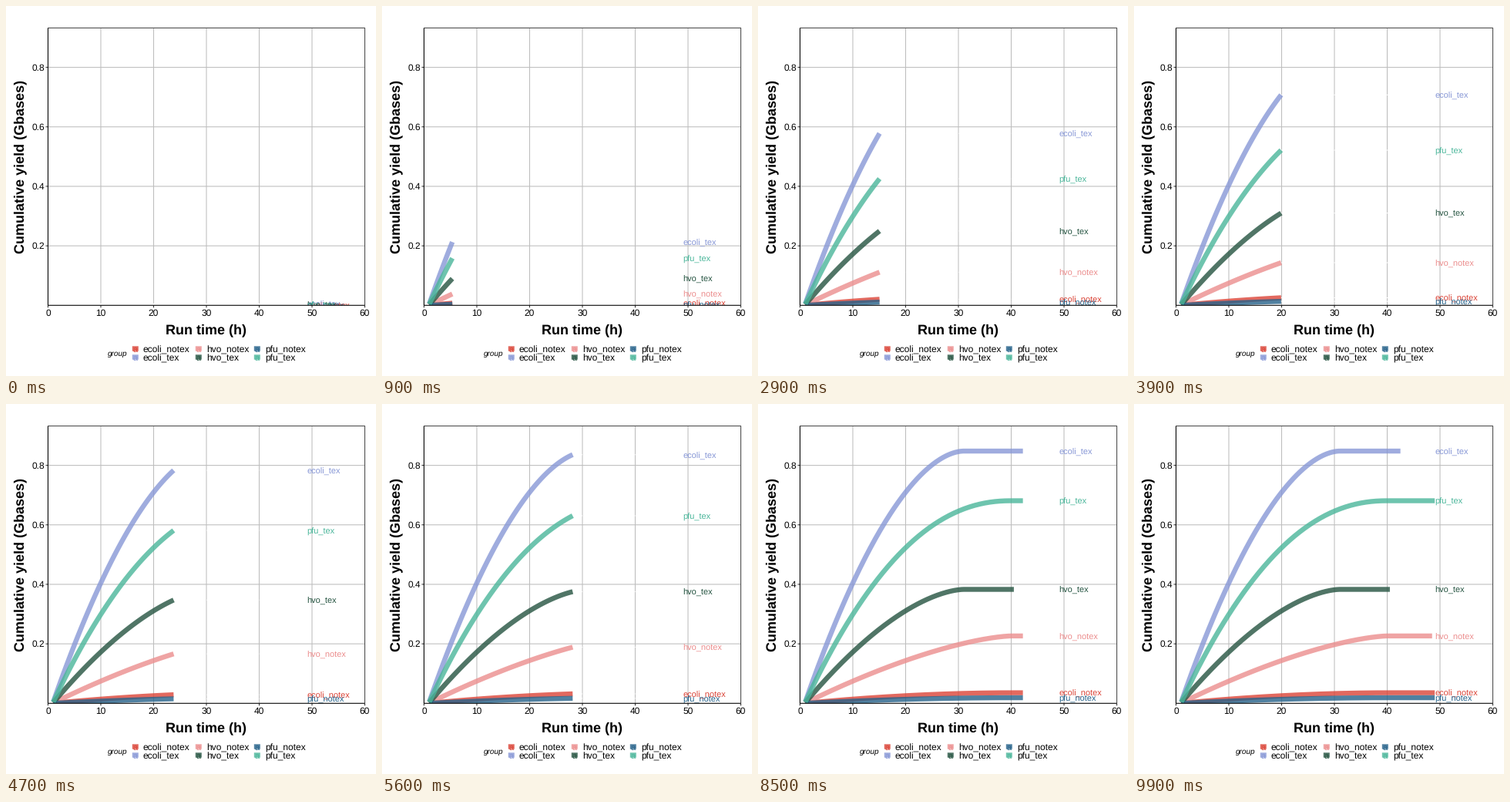
These frames come from a looping animation (480x480 px, 10 s). A matplotlib script:

```python
import numpy as np
import matplotlib.pyplot as plt
from matplotlib.animation import FuncAnimation
from matplotlib.patches import Rectangle

SIZE, DPI = 480, 100
FRAMES, INTERVAL = 100, 100
PT = 72 / DPI
LEFT, RIGHT, TOP, BOTTOM = 54.5, 465.5, 28.5, 388.3
T_START, T_END = 1, 49
ALPHA = 0.8

plt.rcParams.update({
    "font.family": "Liberation Sans",
    "text.hinting": "none",
})

# name: (colour, last hour, saturation hour, final yield, curve power)
GROUPS = {
    "ecoli_notex": ("#db4437", 49, 40, .0355, 1.9),
    "ecoli_tex": ("#8797d6", 42.5, 31, .848, 1.8),
    "hvo_notex": ("#ec8e8e", 48.5, 40, .2265, 1.5),
    "hvo_tex": ("#245340", 40.5, 31, .383, 1.66),
    "pfu_notex": ("#25628a", 49, 40, .0188, 1.85),
    "pfu_tex": ("#4ab69a", 49, 40, .681, 2.18),
}


def px(hour):
    return LEFT + 6.85 * hour


def py(value):
    return BOTTOM - 385.9 * value


def total(t, full, top, power):
    """Yield that rises ever more slowly and stays flat from hour `full`."""
    left = np.clip((full - t) / (full - T_START), 0, 1)
    return top * (1 - 0.994 * left ** power)


fig = plt.figure(figsize=(SIZE / DPI, SIZE / DPI), dpi=DPI, facecolor="white")
ax = fig.add_axes([0, 0, 1, 1])
ax.set_xlim(0, SIZE)
ax.set_ylim(SIZE, 0)
ax.axis("off")


def line(xs, ys, color="black", width=1.07, **kw):
    return ax.plot(xs, ys, color=color, lw=width * PT, snap=False,
                   solid_capstyle="butt", **kw)[0]


def text(x, y, s, size, **kw):
    return ax.text(x, y, s, fontsize=size * PT, va="baseline", **kw)


# Grid, ticks and axis titles
for hour in range(0, 61, 10):
    x = px(hour)
    if 0 < hour < 60:
        line([x, x], [TOP, BOTTOM], "#bebebe", zorder=1)
    line([x, x], [BOTTOM, BOTTOM + 3], "#333333", zorder=6)
    text(x, 401.8, str(hour), 12, ha="center")
for value in (.2, .4, .6, .8):
    y = py(value)
    line([LEFT, RIGHT], [y, y], "#bebebe", zorder=1)
    line([LEFT - 3, LEFT], [y, y], "#333333", zorder=6)
    text(50, y + 3.9, str(value), 12, ha="right")
line([LEFT, RIGHT, RIGHT], [TOP, TOP, BOTTOM], "#4d4d4d", zorder=6)
line([LEFT, LEFT, RIGHT], [TOP, BOTTOM, BOTTOM], zorder=6)
text(260, 425, "Run time (h)", 18, ha="center", weight="bold")
text(23, 208.3, "Cumulative yield (Gbases)", 18, ha="center", weight="bold",
     rotation=90, rotation_mode="anchor")

# Legend
text(132, 454, "group", 10, style="italic")
for k, (name, (color, *_)) in enumerate(GROUPS.items()):
    x, y = 163.8 + 79 * (k // 2), 444.5 + 11 * (k % 2)
    x += 3 * (k // 2 == 1)
    line([x, x + 8], [y, y], color, 6.4, alpha=ALPHA)
    text(x + 4, y + 5, "a", 11, color=color, ha="center")
    text(x + 14, y + 5, name, 12)

# Moving parts, all clipped to the panel
panel = Rectangle((LEFT, TOP), RIGHT - LEFT, BOTTOM - TOP,
                  transform=ax.transData)
parts = []
for k, (name, (color, last, *shape)) in enumerate(GROUPS.items()):
    z = k / 10
    lead = line([], [], "white", ls=(0, (4, 4)), zorder=2 + z)
    trace = line([], [], color, 6.4, alpha=ALPHA, zorder=3 + z,
                 solid_joinstyle="round")
    label = text(px(T_END), 0, name, 11.04, color=color, zorder=4 + z,
                 clip_on=True)
    for part in (lead, trace, label):
        part.set_clip_path(panel)
    parts.append((lead, trace, label, last, shape))


def update(n):
    now = T_START + (T_END - T_START) * n / (FRAMES - 1)
    changed = []
    for lead, trace, label, last, shape in parts:
        end = min(now, last)
        t = np.linspace(T_START, end, 2 + 2 * n)
        y = py(total(t, *shape))
        trace.set_data(px(t), y)
        lead.set_data([px(end), px(T_END)], [y[-1], y[-1]])
        label.set_y(y[-1] + 4.6)
        changed += [lead, trace, label]
    return changed


anim = FuncAnimation(fig, update, frames=FRAMES, interval=INTERVAL,
                     repeat=True, repeat_delay=0, blit=False)
plt.show()
```
